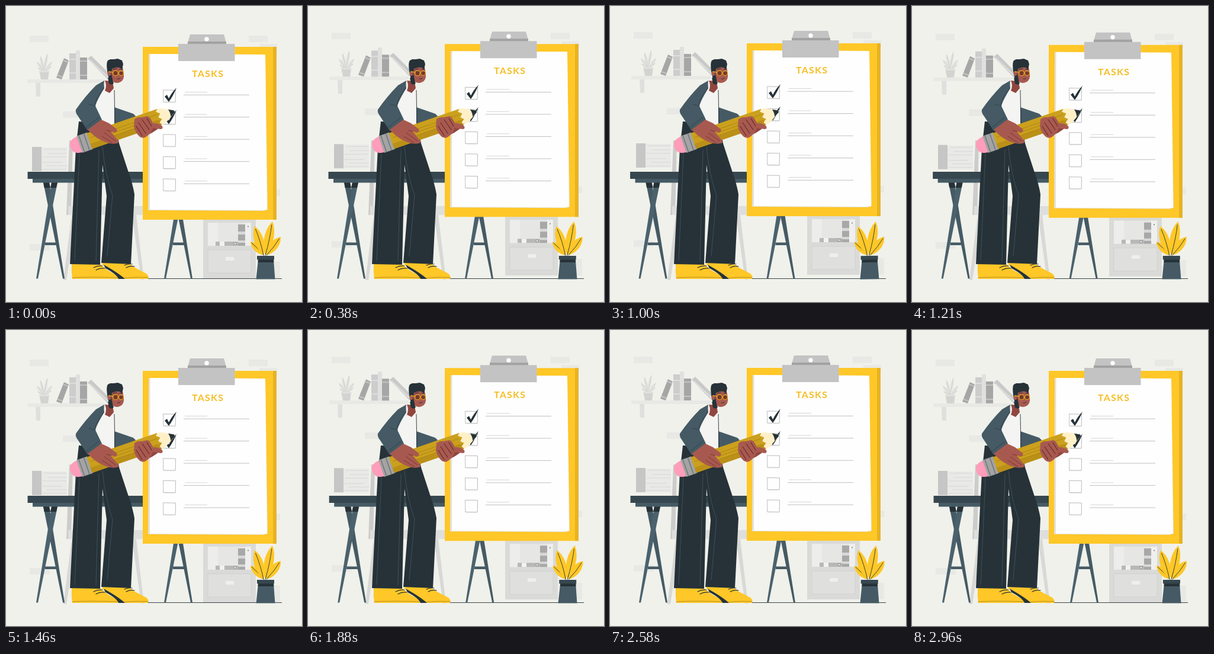
An HTML page for the animation above (3000 ms loop, 500 by 500 pixels).

```html
<!DOCTYPE html>
<html lang="en">
<head>
<meta charset="utf-8">
<title>Tasks</title>
<style>
html, body { margin: 0; width: 100%; height: 100%; overflow: hidden; background: #f0f1eb; }
svg { display: block; width: 100vw; height: 100vh; }
text { font: 700 16px Lato, "Open Sans", sans-serif; letter-spacing: 1.2px; }
.line { fill: none; stroke-linecap: round; stroke-linejoin: round; }
</style>
</head>
<body>
<svg viewBox="0 0 500 500">
  <g class="float">
    <g fill="#e8e9e5">
      <path d="M40 50h32v11h-32zM410 50h32v11h-32zM428 64h30v12h-30zM96 178h30v11h-30zM40 402h34v11h-34zM434 310h29v11h-29zM440 432h23v28h-23z"/>
      <path d="M36 124h134v6h-134z"/>
    </g>
    <path d="M50 130h8v23h-7z" fill="#dfe0dd"/>
    <g id="fern"></g>
    <path d="M56 109h17l-2 15h-12z" fill="#d3d3d1"/>
    <path d="M56 109h17v3h-17z" fill="#e0e0de"/>
    <path d="M98 88l8 4-12 32-9-3z" fill="#a6a6a6"/>
    <path d="M97 92l8 3M87 117l8 3" stroke="#c4c4c4" stroke-width="2"/>
    <path d="M107 80h11v44h-11z" fill="#cdcdcd"/>
    <path d="M118 75h7v49h-7z" fill="#e0e0de"/>
    <path d="M107 90h11M107 113h11M118 80h7" stroke="#dedede" stroke-width="2"/>
    <path d="M125 87h12v37h-12z" fill="#a6a6a6"/>
    <path d="M125 93h12M125 117h12" stroke="#c4c4c4" stroke-width="2"/>
    <path d="M138 89l6-5 34 34-6 6z" fill="#c9c9c9"/>
    <path d="M141 91l32 30" stroke="#e0e0de" stroke-width="2"/>
    <path d="M60 239h43v40h-43z" fill="#e9e9e7"/>
    <path d="M64 242h38M70 249h33M62 255h40M61 264h34M68 270h35M62 276h40" stroke="#cfcfcd" stroke-width=".7"/>
    <path d="M44 238h16v41h-16z" fill="#c6c6c6"/>
    <path d="M333 354h89v106h-89z" fill="#dadad8"/>
    <path d="M341 366h73v39h-73z" fill="#e6e6e4"/>
    <path d="M341 366h17v39h-17z" fill="#ededeb"/>
    <path d="M354 398h38v7h-38z" fill="#b8b8b8"/>
    <path d="M361 398h8v7h-8z" fill="#f2f2f0"/>
    <circle cx="387" cy="401.500" r="2" fill="#eee" stroke="#777" stroke-width=".8"/>
    <path d="M392 369h12v36h-12z" fill="#a8a8a8"/>
    <path d="M392 381h12v5h-12zM392 396h12v4h-12z" fill="#d8d8d8"/>
    <path d="M404 366h10v39h-10z" fill="#efefed"/>
    <circle cx="409" cy="372.500" r="1" fill="#777"/>
    <path d="M341 412h73v39h-73z" fill="#dfdfdd" stroke="#cecfcc" stroke-width=".8"/>
    <rect x="371" y="424" width="14" height="6" rx="1" fill="#efefed"/>
  </g>

  <path d="M107 227h6l-3 126h-8z" fill="#cccccb"/>
  <path d="M105 338h127v15h-127z" fill="#dededc"/>
  <path d="M111 353h8l-17 110h-5zM213 353h7l13 109h-5z" fill="#d8d8d6"/>
  <path d="M190 460.500h276" stroke="#263238" stroke-width=".9"/>

  <g id="desk">
    <g id="trestles"></g>
    <path d="M45 291h200v7.500h-200z" fill="#455a64"/>
    <path d="M36.500 280h208v12h-208z" fill="#37474f"/>
  </g>

  <g class="float">
    <path d="M231 69h226v292h-226z" fill="#ffc727"/>
    <path d="M451 69h6v292h-6z" fill="#e6b323"/>
    <path d="M241 81l197 1 4 262-7 2-195-1z" fill="#e3e1d9"/>
    <path d="M243.500 81l194.500 1 3 262-8 1-190-1z" fill="#fefefe"/>
    <path d="M311 48h57l4 14h-65z" fill="#c3c3c3"/>
    <path d="M307 60h65v5h-65z" fill="#a2a2a2"/>
    <path d="M291 64h95.500v29h-95.500z" fill="#c3c3c3"/>
    <circle cx="339" cy="56" r="3.700" fill="#fff"/>
    <text x="314" y="120" fill="#f5be27">TASKS</text>
    <g id="rows"></g>
  </g>

  <!-- legs and shoes -->
  <path d="M111 436l48 0 12 10 18 10q3 3 0 5h-77q-2-12-1-25z" fill="#ffc727"/>
  <path d="M163 433h43l10 8 21 11q5 4 3 9h-40q-14-9-37-24z" fill="#ffc727"/>
  <path d="M165 437q25 14 36 24h-11q-3-8-22-18z" fill="#263238"/>
  <path class="line" d="M112 459q30-2 77 0M200 459.500q20-2 40-1" stroke="#9b7a1d" stroke-width=".7"/>
  <path class="line" d="M148 442q7-4 15-3M152 446q7-4 15-3M200 438q7-3 13-2M203 442q7-4 14-2" stroke="#263238" stroke-width="1.200"/>
  <path d="M123 195l62 4 6 33 15 46q8 22 11 40l-6 118-50-2 9-113-7-53-4 169-51-1 10-196z" fill="#263238"/>
  <path class="line" d="M124 250l-8 180M163 238q4 45 17 82l-9 102M157 243l-5 188" stroke="#465860" stroke-width=".8"/>

  <!-- torso -->
  <path d="M165 137l16-2q4 30 3 67l-45 4 8-45z" fill="#f4f4f2"/>
  <path d="M183 171l32 11 4 4-8 15-28 1z" fill="#455a64"/>
  <path d="M183 142l1 59" stroke="#263238" stroke-width=".9"/>
  <path d="M167 126q4 8 0 17l8 4 7-8-2-12z" fill="#91463f"/>

  <!-- head -->
  <path d="M174 105q0-7 10-8l12 2q2 8 3 16 1 9-5 13-7 4-13 0-8-8-7-23z" fill="#a8594f"/>
  <path d="M171 110q-2-15 1-18l4-2 6 0 7-1 7 3 2 6-2 10q-3-6-11-4l-6 2-1 9 2 9 1 8q-8-3-8-13z" fill="#263238"/>
  <path d="M172 121q7 3 10 9-3 5-8 1z" fill="#263238"/>
  <ellipse cx="174.500" cy="114" rx="3" ry="4" fill="#a8594f"/>
  <g class="line" stroke="#e2a51e" stroke-width="1.300">
    <circle cx="185" cy="113.500" r="4.300" fill="#74372f"/>
    <circle cx="194.500" cy="113.500" r="4" fill="#74372f"/>
    <path d="M174 111l7 1"/>
  </g>
  <path class="line" d="M181 107l6-1M192 107l4 0M188 123q3 1 5-1" stroke="#263238" stroke-width="1"/>

  <!-- back sleeve -->
  <path d="M166 126l-14 8q-18 18-34 41-1 5 3 10l17 26 24-19-11-23q2-9 15-30-1-8 0-13z" fill="#455a64"/>
  <path class="line" d="M151 169l-11-3M165 139q-14 18-15 28M134 206l23-18" stroke="#2f414a" stroke-width=".9"/>

  <!-- pencil -->
  <path d="M226 207q10-20 22-22 10 3 14 18-16 14-28 16z" fill="#91463f"/>
  <g transform="translate(141 228) rotate(-19)">
    <path d="M-16-14q-18 0-18 14t18 14z" fill="#ff9dba"/>
    <path d="M-18-15h19v30h-19z" fill="#a4a4a4"/>
    <path d="M-14-15v30M-5-15v30" stroke="#6f7476" stroke-width="1.500"/>
    <path d="M122-14l10 1 20 11v3l-20 12-10 1z" fill="#fff0c8"/>
    <path d="M143-7l9 5v3l-9 5q2-6 0-13z" fill="#263238"/>
    <path d="M0-14h126l-4 4 6 5-5 5 5 5-6 4 3 5H0z" fill="#cba01d"/>
    <path d="M0 5h126l-4 4 3 5H0z" fill="#bb9018"/>
    <path d="M4-5h118M20 5h100M30 0h60" stroke="#a67e13" stroke-width=".7"/>
  </g>

  <!-- hands -->
  <path d="M138 209l23-17 13 6 13 10q2 4-3 6l-8-3 14 17q1 3-3 4-9 2-19-2-14-5-26-17z" fill="#a8594f"/>
  <path class="line" d="M166 214l19 14M162 220l17 11M170 210l8 2" stroke="#6f342e" stroke-width=".9"/>
  <path d="M217 191q6-4 12-3l10-2q5 2 9 12 11 0 16 5 2 5-3 5l-13-2q-3 10-13 16-4 2-9-1-8-7-10-18z" fill="#a8594f"/>
  <path class="line" d="M220 203l10 16M224 197l12 18M230 192l12 17M238 190l8 13" stroke="#5f2b28" stroke-width="1.100"/>

  <g id="plant">
    <g id="leaves"></g>
    <path d="M426 428h26l2.500 33.500h-32z" fill="#455a64"/>
    <path d="M426 428h26l.4 5h-26.800z" fill="#263238"/>
    <path d="M424 422h29v6.500h-29z" fill="#37474f"/>
  </g>
</svg>
<script>
const $ = id => document.getElementById(id);
const fill = (id, parts) => { $(id).innerHTML = parts.join(''); };

// Leaf from base (x, y) to tip (u, v), bulging w on both sides
function leaf([x, y, u, v, w], color, vein) {
  const len = Math.hypot(u - x, v - y);
  const nx = (y - v) / len * w, ny = (u - x) / len * w;
  const at = (k, s) => `${x + (u - x) * k + nx * s} ${y + (v - y) * k + ny * s}`;
  return `<path d="M${x} ${y}C${at(.25, 1)} ${at(.7, 1.3)} ${u} ${v}C${at(.7, -1.3)} ${at(.25, -1)} ${x} ${y}" fill="${color}"/>
    <path class="line" d="M${x} ${y}Q${at(.5, .25)} ${at(.9, 0)}" stroke="${vein}" stroke-width=".9"/>`;
}

fill('fern', [
  [64, 110, 70, 80, 3], [64, 110, 58, 84, 3], [64, 110, 52, 94, 3],
  [65, 110, 78, 94, 3], [64, 110, 53, 104, 2], [65, 110, 77, 102, 2]
].map(l => leaf(l, '#e4e5e1', '#c9cac6')));

fill('leaves', [
  [435, 421, 413, 398, 6], [440, 421, 464, 390, 8],
  [435, 421, 420, 372, 9], [438, 421, 450, 364, 9]
].map(l => leaf(l, '#ffc727', '#263238')));

fill('trestles', [0, 216].map(x => `<g transform="translate(${x})">
  <path d="M66 399.500h20v4.500h-20z" fill="#455a64"/>
  <path d="M63 298h10l26 162.500h-3z" fill="#455a64"/>
  <path d="M77 298h10l-33 162.500h-3z" fill="#4b626d"/>
  <path d="M63 298h10l2 9h-10.500zM77 298h10l-2 9h-10z" fill="#263238"/></g>`));

const check = '<path d="M268 153l4-3 3 6q5-10 13-18-5 13-13 24z" fill="#263238"/>';
fill('rows', [0, 1, 2, 3, 4].map(i => `<g transform="translate(0 ${i * 37.5})">
  <path class="line" d="M266 142l20.500.3-.3 20-20-.2z" stroke="#b4b4b4" stroke-width=".9"/>
  <path class="line" d="M265.300 141.500l.4 21M268 162.800h17" stroke="#d2d2d2" stroke-width=".7"/>
  <path d="M300 150.200h111" stroke="#b9b9b9" stroke-width=".9"/>
  <path d="M302 145.500h38" stroke="#c4c4c4" stroke-width=".7"/>
  ${i < 2 ? check : ''}</g>`));

// Steps are [ms, value], joined by straight lines
const lift = [[0, 0], [380, -4.7], [750, -8.8], [1000, -6], [1080, -5], [1460, -.1], [1500, 0]];
const slide = [[0, 0], [380, -2], [710, -3.8], [1000, -2.5], [1460, 0], [1600, 0], [1880, -.8],
  [2170, -3.6], [2580, -2], [2960, 0], [3000, 0]];
const sway = [[0, 0], [380, -.3], [1000, -.6], [1460, 0], [1880, .4], [2580, -.3], [2960, 0], [3000, 0]];

function valueAt(steps, t) {
  const i = steps.findIndex(s => s[0] > t);
  const [a, p] = steps[i - 1], [b, q] = steps[i];
  return p + (q - p) * (t - a) / (b - a);
}

const floats = document.querySelectorAll('.float');
function draw() {
  const t = performance.now() % 3000;
  const y = valueAt(lift, t % 1500);
  floats.forEach(g => g.setAttribute('transform', `translate(0 ${y})`));
  $('desk').setAttribute('transform', `translate(${valueAt(slide, t)})`);
  $('plant').setAttribute('transform', `rotate(${valueAt(sway, t)} 438 462)`);
  requestAnimationFrame(draw);
}
draw();
</script>
</body>
</html>
```
